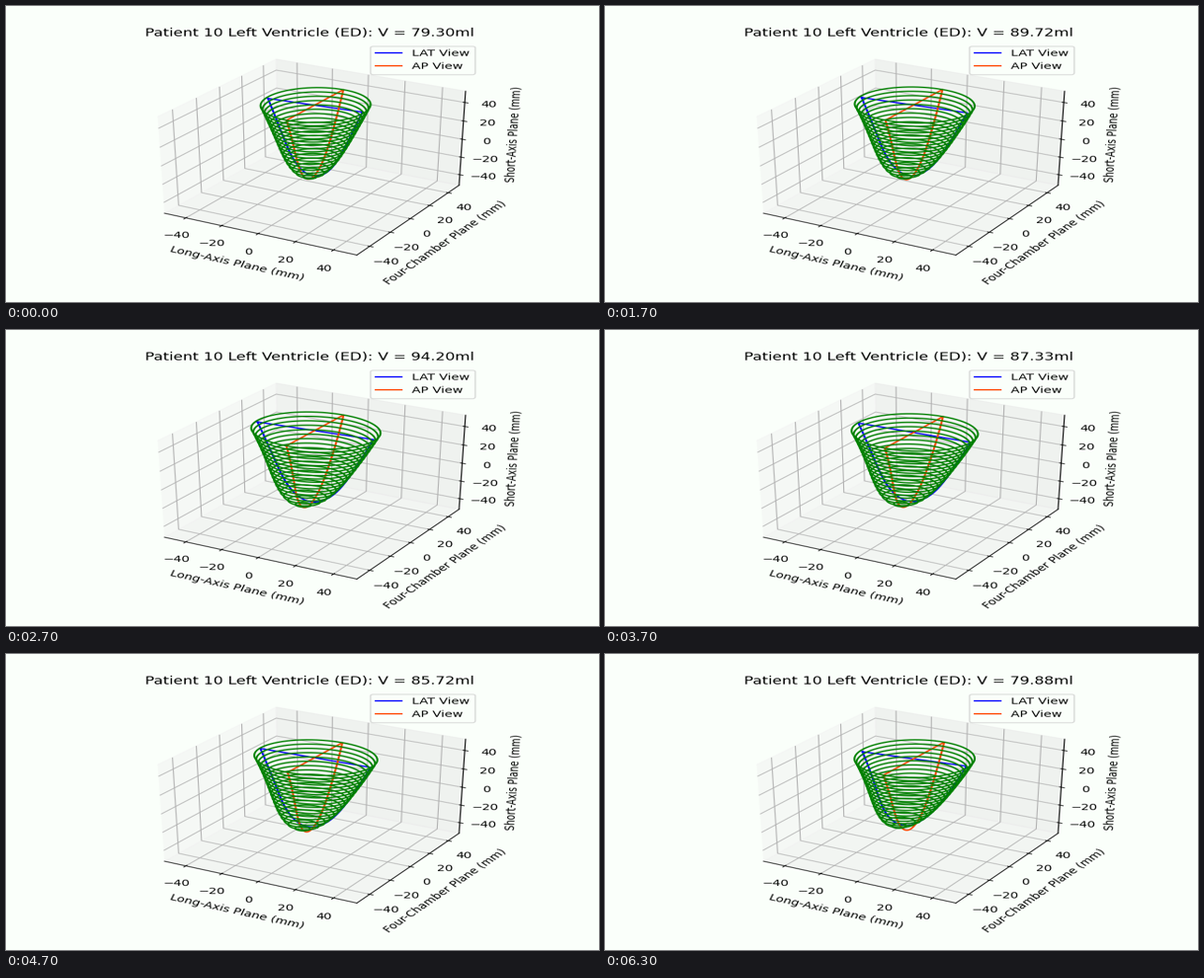
A matplotlib script for the animation above (6.7 s loop, 600x300 px).

```python
import numpy as np
import matplotlib.pyplot as plt
from matplotlib.animation import FuncAnimation
from mpl_toolkits.mplot3d import Axes3D

STAGE_W, STAGE_H = 600, 300
SCENE_W, SCENE_H = 640, 480
DPI = 100
BG = "#fafffa"
POSES = 20
RINGS = 20

VOLUME = [79.30, 77.42, 76.29, 79.69, 84.39, 89.72, 89.95, 92.61, 94.20, 93.47,
          90.16, 87.33, 88.58, 86.41, 85.72, 85.25, 83.94, 86.04, 82.53, 79.88]
LONG_RADIUS = [25.2, 24.9, 24.8, 25.6, 27.0, 28.2, 28.4, 29.9, 31.0, 30.6,
               30.3, 30.0, 30.3, 29.8, 29.5, 29.3, 28.9, 30.2, 28.8, 27.8]

# Slowly varying shape values, interpolated between these poses (mm).
KEYS = [0, 2, 5, 8, 11, 14, 19]
SHAPE = {
    "radius": [26.3, 26.0, 26.4, 26.5, 27.0, 25.4, 28.2],
    "top": [50.5, 49.6, 50.6, 49.0, 47.0, 45.7, 44.6],
    "apex": [-26.5, -29.0, -26.5, -28.9, -28.5, -30.6, -29.8],
    "apex_x": [-1.0, -4.0, -3.0, -2.5, -3.0, -4.0, -6.5],
    "apex_y": [-3.0, -3.0, -3.9, -6.8, -6.8, -4.9, -3.0],
    "tilt": [1.7, 1.3, 1.9, 1.7, 0.5, 0.5, 2.3],
}


def cubic_weights(n_out, n_in):
    """Matrix that resamples n_in samples to n_out with a cubic kernel."""
    step = n_in / n_out
    centers = (np.arange(n_out)[:, None] + 0.5) * step
    d = np.abs(np.arange(n_in) + 0.5 - centers) / step
    near = 1.5 * d**3 - 2.5 * d**2 + 1
    far = -0.5 * d**3 + 2.5 * d**2 - 4 * d + 2
    w = np.where(d < 1, near, np.where(d < 2, far, 0))
    return (w / w.sum(axis=1, keepdims=True)).astype(np.float32)


class StageAxes(Axes3D):
    """3D axes laid out on the scene size, then scaled as a whole to the stage."""

    rows = cubic_weights(STAGE_H, SCENE_H)
    cols = cubic_weights(STAGE_W, SCENE_W)

    def draw(self, renderer):
        scene = type(renderer)(SCENE_W, SCENE_H, DPI)
        super().draw(scene)
        pixels = np.asarray(scene.buffer_rgba()).astype(np.float32)
        half = (self.rows @ pixels.reshape(SCENE_H, -1)).reshape(STAGE_H, SCENE_W, 4)
        image = np.clip(self.cols @ half + 0.5, 0, 255).astype(np.uint8)
        gc = renderer.new_gc()
        renderer.draw_image(gc, 0, 0, np.ascontiguousarray(image[::-1]))
        gc.restore()


def scene_rect():
    """Default subplot area of the scene, made square, in stage fractions."""
    side = 0.77 * SCENE_H
    left = 0.5125 * SCENE_W - side / 2
    bottom = 0.11 * SCENE_H
    return [left / STAGE_W, bottom / STAGE_H, side / STAGE_W, side / STAGE_H]


fig = plt.figure(figsize=(STAGE_W / DPI, STAGE_H / DPI), dpi=DPI, facecolor=BG)
ax = StageAxes(fig, scene_rect())
fig.add_axes(ax)
ax.patch.set_bounds(-2, -2, 5, 5)
ax.patch.set_facecolor(BG)

lat_line, = ax.plot([], [], [], color="blue", label="LAT View")
ap_line, = ax.plot([], [], [], color="orangered", label="AP View")
rings = [ax.plot([], [], [], color="green")[0] for _ in range(RINGS)]

limit = 50 * 25 / 24
ax.set(xlim=(-limit, limit), ylim=(-limit, limit), zlim=(-limit, limit),
       xlabel="Long-Axis Plane (mm)", ylabel="Four-Chamber Plane (mm)",
       zlabel="Short-Axis Plane (mm)")
title = ax.set_title("")
ax.legend(loc="upper right", facecolor=BG)

angle = np.linspace(0, 2 * np.pi, 73)
wall = 1 - np.linspace(1, 0, 50) ** 2
levels = np.linspace(0, 0.985, RINGS)


def profile(s):
    """Relative radius from base (s=0) to apex (s=1)."""
    return (1 - 0.65 * s) * np.sqrt(1 - s**8)


def contour(base, apex, radius, top, bottom, tilt):
    """Closed outline in one view: down one wall, up the other, across the base."""
    center = base + (apex - base) * wall**1.6
    half = radius * profile(wall)
    z = top + (bottom - top) * wall
    lean = tilt * (1 - wall)
    across = np.concatenate([center - half, (center + half)[::-1]])
    height = np.concatenate([z - lean, (z + lean)[::-1]])
    return np.append(across, across[0]), np.append(height, height[0])


def update(tick):
    k = (3 * tick + 1) // 10 % POSES
    p = {name: np.interp(k, KEYS, values) for name, values in SHAPE.items()}
    rx, ry, top, apex = LONG_RADIUS[k], p["radius"], p["top"], p["apex"]
    base_x, base_y = 0.0, 1.0

    x, z = contour(base_x, p["apex_x"], rx, top, apex, p["tilt"])
    lat_line.set_data_3d(x, np.zeros_like(x), z)
    y, z = contour(base_y, p["apex_y"], ry, top, apex, 0)
    ap_line.set_data_3d(np.zeros_like(y), y, z)

    for ring, s in zip(rings, levels):
        drift, r = s**1.6, profile(s)
        cx = base_x + (p["apex_x"] - base_x) * drift
        cy = base_y + (p["apex_y"] - base_y) * drift
        height = np.full_like(angle, top + (apex - top) * s)
        ring.set_data_3d(cx + rx * r * np.cos(angle), cy + ry * r * np.sin(angle), height)

    title.set_text(f"Patient 10 Left Ventricle (ED): V = {VOLUME[k]:.2f}ml")
    return [lat_line, ap_line, *rings, title]


anim = FuncAnimation(fig, update, frames=67, interval=100, repeat=True, repeat_delay=0)
plt.show()
```
